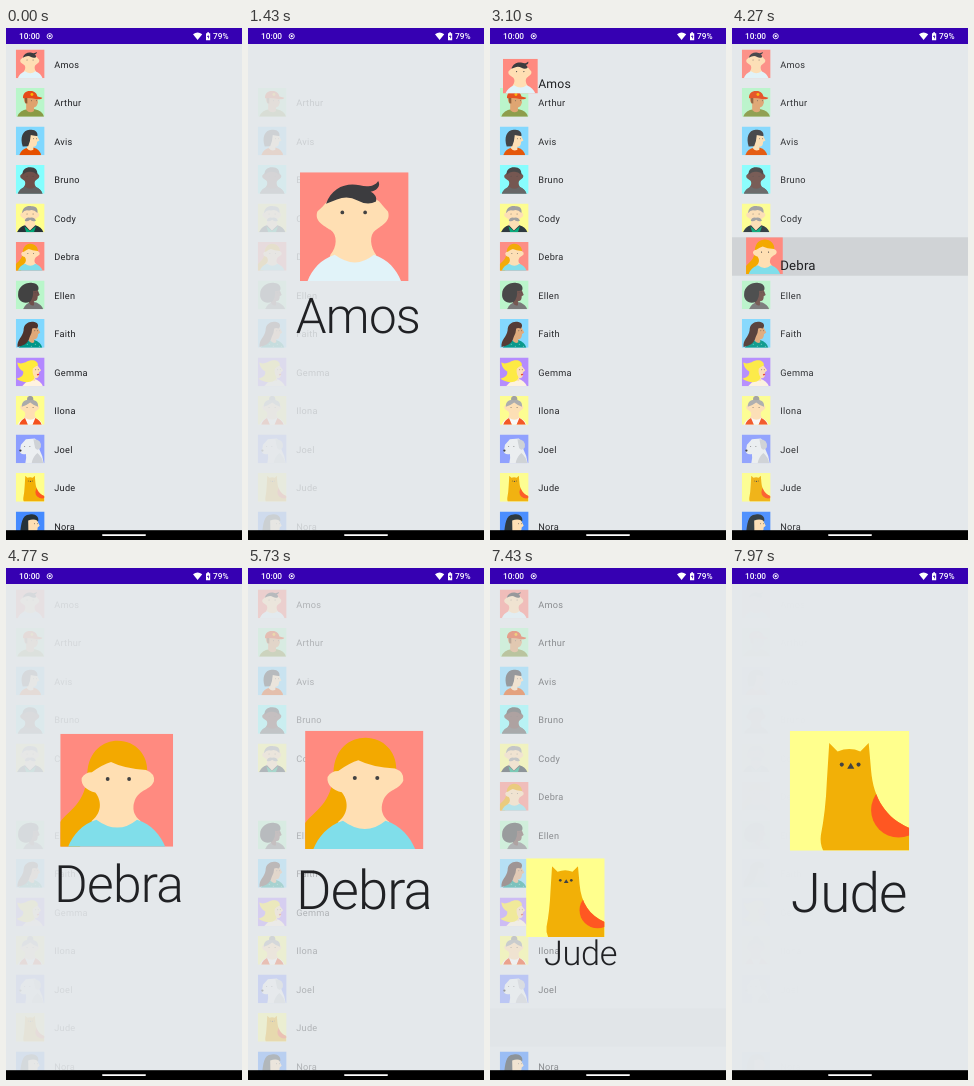
Recreate the animation shown at these times as an HTML page. Size 236x512 px, loop 8 s.

```html
<!DOCTYPE html>
<html lang="en">
<head>
<meta charset="utf-8">
<title>Contacts</title>
<style>
html, body { margin: 0; width: 100%; height: 100%; overflow: hidden; background: #e4e8eb; }
svg { display: block; width: 236px; height: 512px; }
text { font-family: Roboto, Arial, sans-serif; fill: #202124; text-rendering: geometricPrecision; white-space: pre; }
.bar text { fill: #fff; font-size: 8.3px; font-weight: 500; }
</style>
</head>
<body>
<svg viewBox="0 0 236 512">
  <defs id="defs">
    <clipPath id="rowClip"><rect id="rowBox" width="236" height="38.5"/></clipPath>
  </defs>
  <rect width="236" height="512" fill="#e4e8eb"/>
  <g id="list"></g>
  <g clip-path="url(#rowClip)"><circle id="ripple" cx="140" fill="#000"/></g>
  <g id="hero"><use id="heroPic"/><text id="heroName"></text></g>
  <g class="bar">
    <rect width="236" height="16" fill="#3600b2"/>
    <text x="13" y="11.2">10:00</text>
    <circle cx="43.7" cy="8.2" r="2.6" fill="none" stroke="#fff" stroke-width=".9"/>
    <circle cx="43.7" cy="8.2" r="1.1" fill="#fff"/>
    <path d="M187 6.3Q191.6 2.8 196.2 6.3L191.6 12Z" fill="#fff"/>
    <path d="M200 5.2h1.2v-.9h1.8v.9h1.2v7h-4.2Z" fill="#fff"/>
    <path d="M202.4 6.4l-1.4 2.6h1v2l1.4-2.7h-1Z" fill="#3600b2"/>
    <text x="207" y="11.2">79%</text>
  </g>
  <rect y="502.2" width="236" height="9.8" fill="#000"/>
  <rect x="96" y="506.2" width="44" height="1.7" rx=".8" fill="#fff"/>
</svg>
<script>
const $ = id => document.getElementById(id);
const path = (fill, d) => `<path fill="${fill}" d="${d}"/>`;
const dot = (fill, x, y, r) => `<circle fill="${fill}" cx="${x}" cy="${y}" r="${r}"/>`;
const eyes = (a, b, y) => dot('#424242', a, y, 1.7) + dot('#424242', b, y, 1.7);

const SKIN = '#ffdfb3', DARK = '#3c3c3f', BROWN = '#70504a', GREY = '#9e9e9e';
const HEAD = 'M25 27Q49 8 73 27Q77 32 81 36C84 45 75 49 70 53C63 58 65 69 70 76L74 92H24L28 76C34 69 35 58 28 53C22 49 13 45 16 36Q21 32 25 27Z';
const head = path(SKIN, HEAD);
const torso = fill => path(fill, 'M7 100C11 90 19 80 32 76Q51 90 68 76C81 80 89 90 93 100Z');

// Each portrait is drawn on a 100 by 100 square.
const people = [
  ['Amos', '#ff8a80', head + torso('#e1f3f9') +
    path(DARK, 'M24 29C29 14 43 9 55 12C62 14 69 13 72 8C75 13 70 17 65 18C69 20 71 23 70 27Q62 31 53 26Q44 21 34 25Z') + eyes(39, 60, 37)],
  ['Arthur', '#b9f6ca', path('#8a9a45', 'M5 100Q14 76 40 74H66Q92 78 98 100Z') +
    path('#dfa26d', 'M30 30H74L77 51Q72 68 63 68V80Q49 91 36 77V55Q24 49 30 30Z') +
    path('#8d5a35', 'M30 33H40V54L33 53Z') +
    path('#e64a19', 'M25 36C24 17 38 9 52 11C65 11 74 20 75 30L92 34Q91 40 74 39Q48 34 25 36Z') + dot('#ffb300', 56, 23, 5) + eyes(55, 72, 45)],
  ['Avis', '#80d8ff', path('#e65100', 'M12 100Q20 76 43 74H63Q84 80 88 100Z') +
    path(SKIN, 'M38 28Q61 15 73 31L82 49L74 53Q74 70 61 71V81Q48 88 39 77Z') +
    path(DARK, 'M24 70C14 40 23 13 48 12C67 8 78 22 75 33C65 34 57 30 52 30Q51 51 43 69Z') + eyes(62, 72, 43)],
  ['Bruno', '#84ffff', torso('#616161') + path(BROWN, HEAD) + torso('#616161') +
    path('#424242', 'M24 34C21 13 39 7 50 8C66 7 78 18 74 34Q62 22 49 24Q36 22 24 34Z') + eyes(39, 60, 39)],
  ['Cody', '#ffff8d', head + path('#263238', 'M4 100Q14 79 32 76L49 94L68 76Q89 81 96 100Z') +
    path('#00a878', 'M30 79L49 96L70 79L63 100H36Z') +
    path(GREY, 'M22 34C22 12 42 6 55 10C72 8 78 22 75 33Q61 19 46 25Q31 20 22 34ZM31 60Q36 46 49 50Q63 45 70 60Q57 65 50 57Q42 65 31 60Z') + eyes(39, 60, 37)],
  ['Debra', '#ff8a80', path('#f3a900', 'M24 35C25 15 38 6 51 6C67 6 78 19 77 34L55 60H36C37 78 30 91 20 98L17 100H0V78C7 68 23 62 24 35Z') +
    path(SKIN, 'M28 34Q38 27 45 25Q57 31 76 32Q84 35 83 42C80 50 70 49 66 59Q62 70 71 77L73 92H26L28 77C38 69 36 58 31 52C24 50 18 46 19 39Q22 34 28 34Z') +
    torso('#80deea') + eyes(42, 61, 40)],
  ['Ellen', '#b9f6ca', path('#757575', 'M25 100Q34 78 56 74L72 77Q91 86 95 100Z') +
    path(BROWN, 'M44 27H74L83 51L76 55Q77 73 63 72V86Q53 91 45 77Z') +
    path('#424242', 'M49 74C26 85 6 68 8 48C8 20 36 5 58 9C75 10 82 23 78 33Q66 38 60 36Q62 61 49 74Z') + eyes(67, 75, 43)],
  ['Faith', '#80d8ff', path('#009688', 'M10 100Q24 80 49 73H64Q87 80 92 100Z') +
    path('#e0a878', 'M45 25H73L85 47L77 53Q77 70 64 71V81Q54 87 45 77Z') +
    path('#4e342e', 'M48 64C42 89 22 94 6 98C3 72 24 63 27 40C27 15 49 6 65 11C78 14 81 26 73 33Q62 30 57 33Q56 51 48 64Z') +
    [40, 54, 68, 82].map((x, i) => dot('#80cbc4', x, 88 + i % 2 * 7, 2)).join('') + eyes(66, 75, 41)],
  ['Gemma', '#b388ff', path('#fff3e0', 'M22 100Q40 77 64 74Q87 82 94 100Z') +
    path(SKIN, 'M45 31L72 24L88 45L80 52Q84 72 67 72V83L49 78Z') +
    path('#ffeb3b', 'M5 18Q17 24 34 17C57 3 77 12 77 27Q64 34 59 39Q56 55 65 69C62 88 30 93 2 74Q29 68 26 49Q9 41 5 18Z') +
    path('#e53935', 'M73 58L82 57Q81 64 75 63Z') + eyes(69, 78, 43)],
  ['Ilona', '#ffff8d', dot(GREY, 50, 11, 11) + head + torso('#fafafa') +
    path('#f4511e', 'M12 100Q17 84 32 77L42 100ZM68 77Q84 85 90 100H58Z') +
    path('#ababab', 'M21 38C19 17 37 12 50 15C67 12 80 22 77 38Q65 35 50 23Q36 34 21 38Z') + eyes(39, 60, 40)],
  ['Joel', '#8c9eff', path('#eceff1', 'M18 36L35 17L66 14Q82 27 82 52Q95 75 97 100H33Q38 82 35 68Q16 71 14 59Z') +
    path('#cfd2d6', 'M61 17Q91 17 87 45Q76 60 67 47ZM55 100Q59 78 75 65Q93 81 95 100Z') + dot(DARK, 16, 56, 4) + eyes(31, 49, 42)],
  ['Jude', '#ffff8d', '<clipPath id="cat"><path d="M33 10L40 17Q50 13 59 17L66 10L68 33C70 57 81 73 100 81V100H28Q25 94 26 87Q30 67 31 42Z"/></clipPath>' +
    '<g clip-path="url(#cat)">' + path('#f2b007', 'M0 0H100V100H0Z') + dot('#ff5722', 91, 66, 23) + '</g>' +
    eyes(43.5, 57.5, 28) + path('#424242', 'M48 31.5L51 26.5L54 31.5Z')],
  ['Nora', '#448aff', path('#263238', 'M14 80C20 43 19 13 48 11C67 6 81 18 78 33L62 41L54 94H9Z') +
    path(SKIN, 'M43 32Q62 24 74 32L83 50L76 56Q76 72 63 73V88H44Z') + path('#eceff1', 'M10 100Q20 82 44 77L62 81Q85 84 92 100Z') + eyes(65, 75, 43)]
];

const PITCH = 38.5, SMALL = 9.2, LARGE = 55.1;
const rowTop = i => 16.7 + PITCH * i;

people.forEach(([name, bg, art], i) => {
  $('defs').innerHTML += `<symbol id="face${i}" viewBox="0 0 100 100">${path(bg, 'M0 0H100V100H0Z')}${art}</symbol>`;
  $('list').innerHTML += `<g><use href="#face${i}" x="9.8" y="${rowTop(i) + 4.7}" width="28.8" height="28.8"/>` +
    `<text x="48.2" y="${rowTop(i) + 22.8}" font-size="${SMALL}" letter-spacing=".29">${name}</text></g>`;
});

// Tap, start of the list's return, start of the portrait's return.
const visits = [
  { row: 0, tap: 700, back: 2370, home: 2410 },
  { row: 5, tap: 3970, back: 5470, home: 5645 },
  { row: 11, tap: 6930, back: Infinity, home: Infinity }
];
const LOOP = 8000, MOVE = 1000, DELAY = 132;

const clamp = v => Math.max(0, Math.min(1, v));
const mix = (a, b, p) => a + (b - a) * p;

// cubic-bezier(.4, 0, .2, 1)
function ease(u) {
  u = clamp(u);
  if (u === 0 || u === 1) return u;
  let lo = 0, hi = 1;
  for (let i = 0; i < 24; i++) {
    const s = (lo + hi) / 2, r = 1 - s;
    if (1.2 * s * r * r + .6 * s * s * r + s * s * s < u) lo = s; else hi = s;
  }
  return lo * lo * (3 - 2 * lo);
}

const pen = document.createElement('canvas').getContext('2d');
function largeWidth(name) {
  pen.font = `300 ${LARGE}px Roboto, Arial, sans-serif`;
  return pen.measureText(name).width - .86 * name.length;
}

function set(el, attrs) {
  for (const key in attrs) el.setAttribute(key, attrs[key]);
}

function draw(t) {
  const visit = visits.filter(v => v.tap <= t).pop();
  [...$('list').children].forEach((g, i) => {
    g.style.visibility = visit && i === visit.row ? 'hidden' : 'visible';
  });
  $('hero').style.display = visit ? '' : 'none';
  $('ripple').style.display = visit ? '' : 'none';
  if (!visit) { $('list').style.opacity = 1; return; }

  const { row, tap, back, home } = visit, top = rowTop(row), age = t - tap;
  const out = ease((age - DELAY) / MOVE);
  const p = t < home ? out : 1 - ease((t - home) / MOVE);
  $('list').style.opacity = t < back ? 1 - out : ease((t - back) / MOVE);

  $('rowBox').setAttribute('y', top);
  set($('ripple'), {
    cy: top + PITCH / 2,
    r: 20 + 135 * (1 - (1 - clamp(age / 225)) ** 2),
    opacity: .1 * clamp(age / 75) * (1 - clamp((age - 280) / 250))
  });

  const size = mix(28.8, 120, p), name = people[row][0];
  set($('heroPic'), {
    href: '#face' + row, width: size, height: size,
    x: mix(9.8, 58, p), y: mix(top + 4.7, 161.8, p)
  });
  set($('heroName'), {
    x: mix(48.2, 117 - largeWidth(name) / 2, p), y: mix(top + 22.8, 343, p),
    'font-size': mix(SMALL, LARGE, p), 'letter-spacing': mix(.29, -.86, p),
    'font-weight': p < .3 ? 400 : 300
  });
  if ($('heroName').textContent !== name) $('heroName').textContent = name;
}

const begin = performance.now();
function tick() {
  draw((performance.now() - begin) % LOOP);
  requestAnimationFrame(tick);
}
tick();
</script>
</body>
</html>
```
